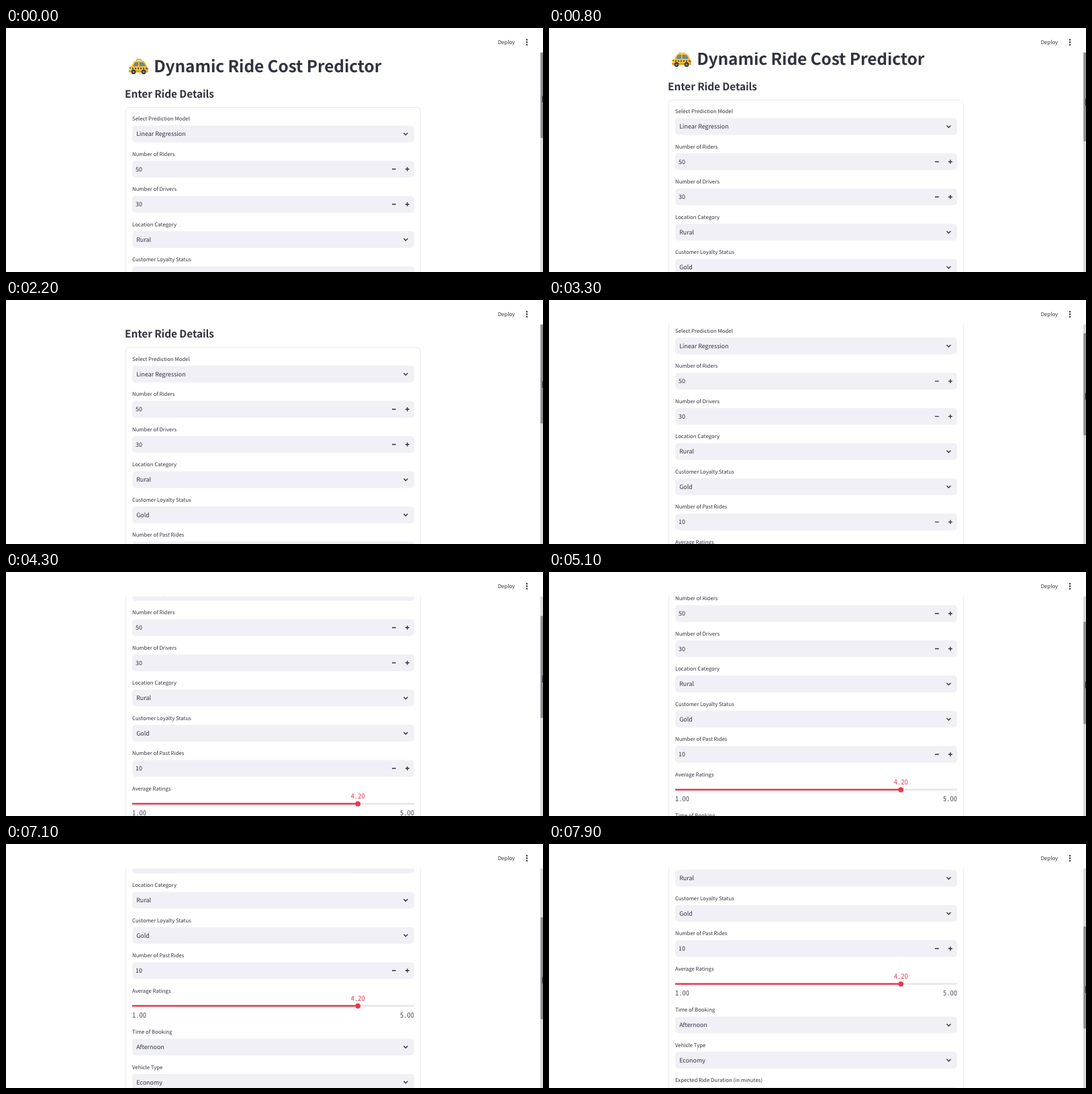
An HTML page that plays this animation: 800x364 px, repeating every 8 s.

```html
<!DOCTYPE html>
<html lang="en">
<head>
<meta charset="utf-8">
<title>Ride cost form</title>
<style>
html, body { margin: 0; width: 100%; height: 100%; overflow: hidden; background: #fff; }
svg { display: block; width: 800px; height: 364px; }
text { font: 8.93px "Noto Sans CJK JP", "Noto Sans CJK SC", "Noto Sans CJK", "Open Sans", sans-serif;
  fill: #31333f; text-rendering: geometricPrecision; }
text.label { font-size: 7.81px; }
text.title { font-size: 24.5px; font-weight: 700; letter-spacing: -.005em; }
text.sub { font-size: 15.4px; font-weight: 600; letter-spacing: -.005em; }
text.mono { font: 10.5px "Noto Sans Mono CJK JP", "Noto Sans Mono CJK SC", monospace; fill: #4c4e58; }
text.red { fill: #e8405a; }
.icon { fill: none; stroke: #31333f; stroke-width: 1.4; }
</style>
</head>
<body>
<svg viewBox="0 0 800 364">
  <clipPath id="view"><rect y="36.5" width="800" height="328"/></clipPath>
  <g clip-path="url(#view)">
    <g id="page">
      <g id="taxi">
        <path d="M195 46.5h6l1 3.5h-8z" fill="#f5d36b" stroke="#8d6a2c" stroke-width=".6"/>
        <path d="M187 57l3-6q1-2 4-2h9q3 0 4.500 2.500l2.500 5.500 1.500 2v6q0 1.500-1.500 1.500h-25q-2 0-2-2v-5q0-2 4-2.500z" fill="#f9c22e"/>
        <path d="M189 57l2.400-4.800q.6-1.200 2-1.200h3.600v6zM198.500 51h4.500q2 0 3 1.800l2 4.200h-9.500z" fill="#6d8796"/>
        <path d="M184 60.200h26" stroke="#403c38" stroke-width="2" stroke-dasharray="2 2"/>
        <path d="M183 63.500h28.500v2h-28.500z" fill="#d79626"/>
        <circle cx="184.500" cy="61.500" r="1.300" fill="#fff3c0"/>
        <circle cx="210.800" cy="61" r="1.200" fill="#e25344"/>
        <g fill="#8b8f94" stroke="#35363b" stroke-width="1.800">
          <circle cx="190" cy="65.500" r="2.500"/><circle cx="205" cy="65.500" r="2.500"/>
        </g>
      </g>
      <rect x="178.500" y="118.500" width="439" height="700" rx="5" fill="none" stroke="#e3e3e8" stroke-width=".8"/>
    </g>
  </g>
  <text class="label" x="732.700" y="24.200">Deploy</text>
  <g fill="#31333f">
    <circle cx="776" cy="17.500" r="1.200"/><circle cx="776" cy="21.200" r="1.200"/><circle cx="776" cy="24.900" r="1.200"/>
  </g>
  <g clip-path="url(#view)">
    <rect x="796" y="36" width="4" height="328" fill="#dadadb"/>
    <g id="bar">
      <rect x="796.300" y="12" width="4" height="152.300" rx="1" fill="#8e8e92"/>
      <rect x="798.800" y="101" width="1.200" height="10" fill="#303034"/>
    </g>
  </g>
</svg>
<script>
const page = document.getElementById("page"), bar = document.getElementById("bar");
const add = markup => page.insertAdjacentHTML("beforeend", markup);
const text = (x, y, str, cls = "", anchor = "start") =>
  add(`<text class="${cls}" x="${x}" y="${y}" text-anchor="${anchor}">${str}</text>`);

// y is the middle of the input box
function field(y, label, value, isNumber) {
  text(188, y - 19.7, label, "label");
  add(`<rect x="188" y="${y - 12.4}" width="420" height="24.8" rx="5" fill="#f0f0f6"/>`);
  text(isNumber ? 193 : 194.2, y + 3.4, value);
  add(`<path class="icon" d="${isNumber
    ? `M575 ${y}h5.800M595 ${y}h5.800M597.900 ${y - 2.9}v5.800`
    : `M592.500 ${y - 1.6}l3 3 3-3`}"/>`);
}

text(220.2, 65.6, "Dynamic Ride Cost Predictor", "title");
text(177, 103.8, "Enter Ride Details", "sub");
field(158, "Select Prediction Model", "Linear Regression");
field(210.5, "Number of Riders", 50, true);
field(263, "Number of Drivers", 30, true);
field(315.5, "Location Category", "Rural");
field(368, "Customer Loyalty Status", "Gold");
field(420.5, "Number of Past Rides", 10, true);

text(188, 453.3, "Average Ratings", "label");
add(`<path d="M188 473.300h420" stroke="#e5e5eb" stroke-width="2.500"/>
  <path d="M188 473.300h336" stroke="#e83a52" stroke-width="2.500"/>
  <circle cx="524.200" cy="473.300" r="3.900" fill="#e83a52"/>`);
text(524.2, 465.7, "4.20", "mono red", "middle");
text(188, 490.3, "1.00", "mono");
text(608, 490.3, "5.00", "mono", "end");

field(534.5, "Time of Booking", "Afternoon");
field(587, "Vehicle Type", "Economy");
field(639.5, "Expected Ride Duration (in minutes)", 30, true);

// [time in ms, scroll offset in px]
const path = [[0, 0], [800, 11], [2200, 47.5], [4300, 127.5], [5100, 148.5],
  [5200, 152], [5300, 152], [6400, 203], [7900, 264.5]];

function scrollAt(t) {
  const i = Math.max(1, path.findIndex(p => p[0] >= t));
  const [t0, s0] = path[i - 1], [t1, s1] = path[i];
  return s0 + (s1 - s0) * (t - t0) / (t1 - t0);
}

function draw(now) {
  const s = scrollAt(Math.floor(now % 8000 / 100) * 100);
  page.setAttribute("transform", `translate(0 ${-s})`);
  bar.setAttribute("transform", `translate(0 ${s * .42})`);
  requestAnimationFrame(draw);
}
draw(performance.now());
</script>
</body>
</html>
```
